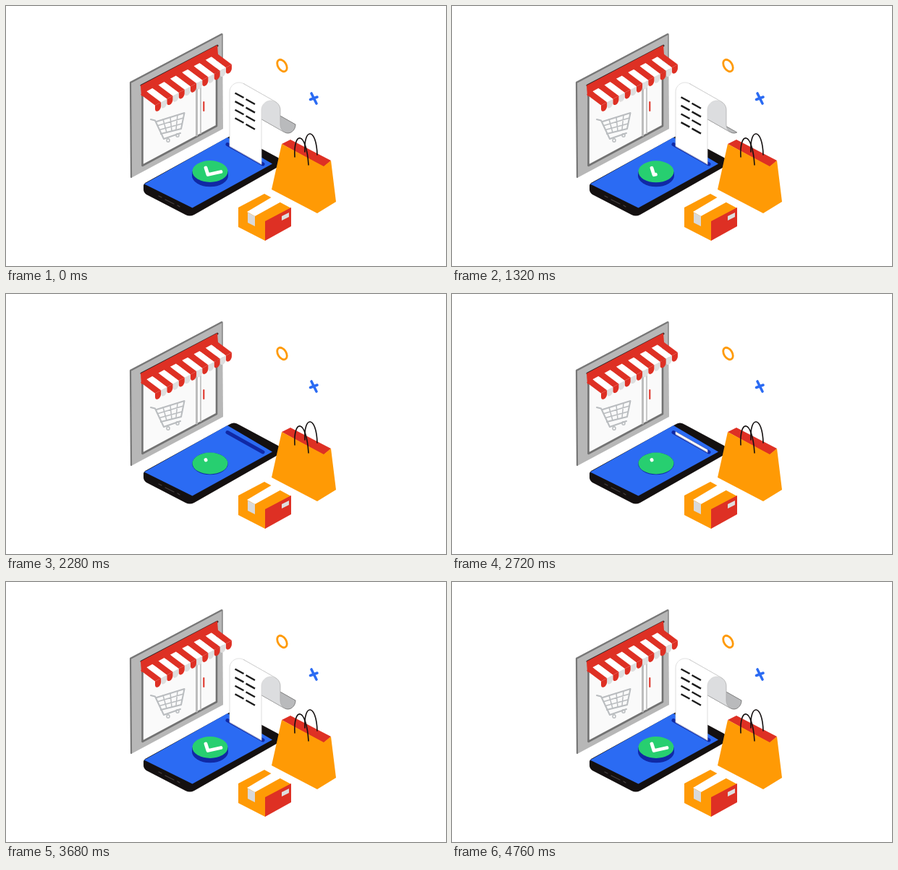
Write an HTML page with a canvas that moves like this. It is 608 px wide and 360 px high and loops after 4800 ms.

```html
<!DOCTYPE html>
<html lang="en">
<head>
<meta charset="utf-8">
<title>Mobile shopping</title>
<style>
  html, body { margin: 0; width: 100%; height: 100%; overflow: hidden; background: #fff; }
  canvas { display: block; }
</style>
</head>
<body>
<canvas id="stage" width="608" height="360"></canvas>
<script>
const ctx = document.getElementById('stage').getContext('2d');
const LOOP = 4800;
const RED = '#de3024', ORANGE = '#ff9a05', BLUE = '#2b6bf3', NAVY = '#1029a5', BLACK = '#141010';
const WIDTH_X = 44, WIDTH_Y = 25; // paper width on screen

ctx.lineCap = ctx.lineJoin = 'round';

function fill(path, color) {
  ctx.fillStyle = color;
  ctx.fill(new Path2D(path));
}

function line(path, color, width) {
  ctx.strokeStyle = color;
  ctx.lineWidth = width;
  ctx.stroke(new Path2D(path));
}

function ellipse(x, y, rx, ry, rotation = 0) {
  ctx.beginPath();
  ctx.ellipse(x, y, rx, ry, rotation, 0, 2 * Math.PI);
}

const ease = p => p < .5 ? 2 * p * p : 1 - 2 * (1 - p) ** 2;
const ramp = (t, from, to) => ease(Math.min(1, Math.max(0, (t - from) / (to - from))));

function drawWindow() {
  fill('M171 105L299 38L300 170L173 238Z', '#b7b7b7');
  line('M173 237L172 106L298 39', '#777', 2.2);
  line('M299 39V90', '#858585', 1.5);
  fill('M189 112L292 57L291 166L189 222Z', '#fafafa');
  line('M188.500 120V221L291 166V70', '#727272', 2.6);
  line('M187 110L292 55', '#302525', 3);
  line('M263.500 104V179', '#bdbdbd', 3);
  line('M269 101V176', '#c8c8c8', 2);
  line('M273.3 133V145', RED, 2);
}

function drawCart() {
  const grey = '#b9bcbf';
  line('M200 157L206 158.500L218 184L241 176', grey, 2);
  line('M208 160L246.500 148L242 170L214 177', grey, 2);
  line('M210 165.500L245 155M212 171.500L243 163M217 157L222 175M227 154L229 173M237 151L235 171', grey, 1.5);
  for (const [x, y] of [[224, 186], [237, 179]]) {
    ellipse(x, y, 2, 2.3);
    ctx.lineWidth = 1.5;
    ctx.stroke();
  }
}

function drawAwning() {
  fill('M186 110L292 54L293 67L187 125Z', RED);
  const dx = 8.15, dy = -4.35;
  for (let i = 12; i >= 0; i--) {
    const x = 186 + dx * i, y = 122.5 + dy * i, red = i % 2 === 0;
    const drop = `M${x + 20} ${y + 15}l${dx} ${dy}v5c0 7 ${-dx} 11 ${-dx} 4Z`;
    fill(`M${x} ${y}l${dx} ${dy}l20 15l${-dx} ${-dy}Z`, red ? RED : '#fff');
    fill(drop, red ? RED : '#dedede');
  }
}

function drawPhone() {
  fill('M190 249Q190 246 194 244L308 181Q315 176 322 181L376 210Q380 213 379 221L260 289Q254 292 248 289L194 261Q190 258 190 254Z', BLACK);
  fill('M191 246.500L306 182L368 218.500L257.500 279.500Z', BLUE);
  line('M211 263l4 2M220 268l12 6M237 276l3 2', '#453f3f', 1.2);
  line('M306 191.500L355 219', NAVY, 5);
}

function drawBadge(rise, written) {
  const x = 282, y = 234.5 - 5.5 * rise;
  ctx.fillStyle = NAVY;
  ellipse(x, 235, 24.8, 15.3);
  ctx.fill();
  if (rise > 0) {
    ctx.fillRect(x - 24.8, y, 49.6, 235 - y);
    ellipse(x, 229 + 6 * rise, 24.8, 15);
    ctx.fill();
  }
  ctx.fillStyle = '#27cf70';
  ellipse(x, y, 24.5, 15);
  ctx.fill();
  ctx.setLineDash([Math.max(.5, 31 * written), 60]);
  line(`M${x - 6} ${y - 5}l3 9.500l18 -4`, '#fff', 4.8);
  ctx.setLineDash([]);
}

// Right-hand edge of the paper: up, over the arch, down, then the loose curl.
function edgePoint(s) {
  if (s < 75) return [353, 219 - s];
  s -= 75;
  if (s < 40.8) return [366 - 13 * Math.cos(s / 13), 144 - 13 * Math.sin(s / 13)];
  s -= 40.8;
  if (s < 21) return [379, 144 + s];
  const a = (s - 21) / 35.2 * Math.PI;
  return [389.5 - 10.5 * Math.cos(a), 164 + 12 * Math.sin(a)];
}

function sheet(from, to, color, outline) {
  if (to <= from) return;
  const edge = [];
  for (let s = from; s < to; s++) edge.push(edgePoint(s));
  edge.push(edgePoint(to));
  const far = edge.map(([x, y]) => [x - WIDTH_X, y - WIDTH_Y]).reverse();
  const path = 'M' + [...edge, ...far].join('L') + 'Z';
  fill(path, color);
  line(path, outline, .8);
}

function drawReceipt(hidden) {
  const shift = 156 * hidden;
  const length = 172 - shift - 16 * Math.min(1, shift / 13);
  if (length <= 0) return;
  sheet(149, length, '#b9babc', '#666');
  sheet(102, Math.min(length, 149), '#dcdddf', '#aaa');
  sheet(0, Math.min(length, 102), '#fff', '#d5d5d5');

  ctx.save();
  ctx.clip(new Path2D('M309 100L353 125V219L309 194Z'));
  ctx.lineCap = 'butt';
  for (let row = 0; row < 4; row++) {
    const y = 120.5 + 11.6 * row + shift;
    line(`M316.500 ${y}l12 6.500M331.500 ${y + 8.5}l12.500 7`, '#1c1c1c', 2.4);
  }
  ctx.restore();
}

function drawBag() {
  fill('M381 191L393 185L449 214L439 223Z', RED);
  line('M413 202C411 168 429 168 430 206', BLACK, 1.6);
  fill('M381 191L439 222L449 214L456 271L430 287L367 254Z', ORANGE);
  line('M399 209C397 173 415 172 418 220', BLACK, 1.6);
}

function drawBox() {
  fill('M321 279L357 260L394 280L358 325L321 306Z', ORANGE);
  fill('M358 298L394 279V305L358 325Z', RED);
  fill('M333 285L370 263L382 270L344 291Z', '#fff');
  fill('M334 286L344 291V305L334 300Z', '#d9d9d9');
  fill('M381 291L391 286V292L381 297Z', '#dedede');
}

function drawSparks() {
  ctx.strokeStyle = ORANGE;
  ctx.lineWidth = 2.8;
  ellipse(381.5, 82.5, 5.7, 9, -.55);
  ctx.stroke();
  line('M422 121L429 135M420.500 129.500L430 126', BLUE, 3.6);
}

function render(now) {
  const t = now % LOOP;
  const hidden = ramp(t, 1220, 1960) - ramp(t, 2640, 3446);
  const rise = 1 - ramp(t, 1250, 1700) + ramp(t, 2780, 3150);
  const written = 1 - ramp(t, 1100, 1500) + ramp(t, 2930, 3260);
  ctx.fillStyle = '#fff';
  ctx.fillRect(0, 0, 608, 360);
  drawWindow();
  drawCart();
  drawAwning();
  drawPhone();
  drawBadge(rise, written);
  drawReceipt(hidden);
  drawBag();
  drawBox();
  drawSparks();
}

const start = performance.now();
function tick() {
  render(performance.now() - start);
  requestAnimationFrame(tick);
}
tick();
</script>
</body>
</html>
```
